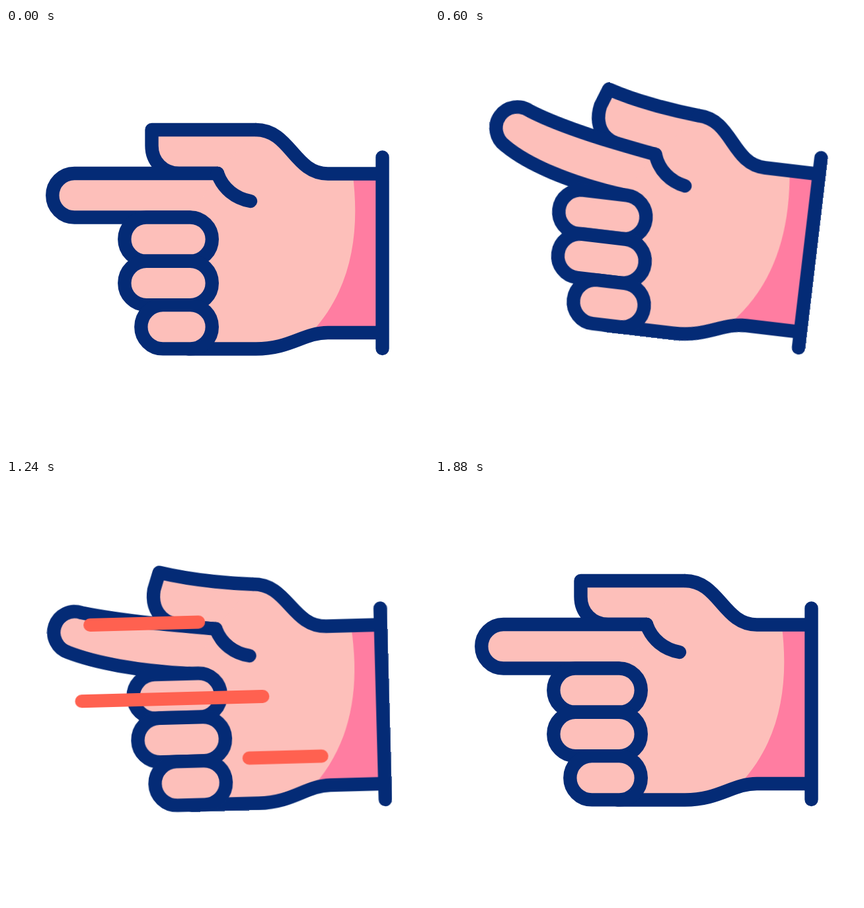
An HTML page without scripts for the animation above (2000 ms loop, 640 by 640 pixels).

```html
<!DOCTYPE html>
<html lang="en">
<head>
<meta charset="utf-8">
<title>Pointing hand</title>
<style>
  @property --head { syntax: "<length>"; inherits: false; initial-value: 0px; }
  @property --tail { syntax: "<length>"; inherits: false; initial-value: 0px; }

  html, body { margin: 0; width: 100%; height: 100%; overflow: hidden; background: #fff; }
  svg { display: block; width: 100%; height: 100%; }

  .ink { fill: none; stroke: #042b76; stroke-width: 20.4; stroke-linecap: round; stroke-linejoin: round; }
  .skin { fill: #fdbfba; }
  .shade { fill: #ff7da1; }

  .hand, .thumb, .index, .curled, .speed {
    animation: 2s cubic-bezier(.5, 0, .5, 1) infinite;
  }

  .hand { transform-origin: 569.5px 320px; animation-name: swing; }
  @keyframes swing {
    0%, 15%, 94%, 100% { transform: rotate(0deg); }
    44.5%, 46% { transform: rotate(13deg); }
    73.6% { transform: rotate(-9.1deg); }
  }

  .thumb {
    --rest: path("M378 154C335 154 280 154 220.5 154L220.5 178C220.5 202 238 220 262 220C280 220 300 220 320 220");
    --bent: path("M378 154C335 150 280 140 243 124L231 151C224 180 236 201 259 208C280 214 300 218 320 220");
    d: var(--rest);
    animation-name: bend-thumb;
  }
  .index {
    --rest: path("M320 220C255 220 180 220 103.5 220C85 220 70.3 235 70.3 253.3C70.3 271.6 85 286.5 103.5 286.5C150 286.5 210 286.5 278 286.5");
    --bent: path("M320 220C255 207 180 192 129 166C114 155 93 158 82 173C71 188 75 209 90 220C124 250 190 275 278 286.5");
    d: var(--rest);
    animation-name: bend-index;
  }
  /* the thumb relaxes a little later than the index finger */
  @keyframes bend-thumb {
    0%, 14.5%, 79%, 100% { d: var(--rest); animation-timing-function: cubic-bezier(.33, 0, .3, 1); }
    43%, 53% { d: var(--bent); animation-timing-function: cubic-bezier(.33, 0, .67, 1); }
  }
  @keyframes bend-index {
    0%, 14.5%, 72.5%, 100% { d: var(--rest); animation-timing-function: cubic-bezier(.33, 0, .3, 1); }
    43%, 53% { d: var(--bent); animation-timing-function: cubic-bezier(.33, 0, .67, 1); }
  }

  .curled { animation-name: slide; animation-delay: var(--lag); }
  @keyframes slide {
    0%, 15%, 72%, 100% { transform: translateX(0); }
    44.5%, 52% { transform: translateX(var(--shift)); }
  }

  /* each line grows from its right end, then its tail catches up */
  .speed {
    stroke: #ff6150; stroke-width: 20; stroke-linecap: round; fill: none; opacity: 0;
    stroke-dasharray: calc(var(--head) - var(--tail)) 200px;
    stroke-dashoffset: calc(0px - var(--tail));
    animation-name: dash;
    animation-timing-function: cubic-bezier(.333, 0, .667, 1);
    animation-delay: var(--at);
  }
  @keyframes dash {
    0% { --head: 0px; --tail: 0px; opacity: 1; }
    12.6% { --tail: 0px; }
    16.7% { --head: 100px; }
    29.3% { --tail: 100px; opacity: 1; }
    29.31%, 100% { --head: 100px; --tail: 100px; opacity: 0; }
  }
</style>
</head>
<body>
<svg viewBox="0 0 640 640">
  <g class="hand">
    <path class="skin" d="M378 154C430 154 436 220.5 487 220.5H569V461H487C450 461 430 485.5 378 485.5H285V286.5H270L300 235L330 200L365 160Z"/>
    <path class="shade" d="M524.5 220C536 310 523 395 462 461H569V220Z"/>
    <path class="ink skin thumb"/>
    <path class="ink skin index"/>

    <!-- palm outline, cuff and crease -->
    <path class="ink" d="M378 154C430 154 436 220.5 487 220.5H569M569 461H487C450 461 430 485.5 378 485.5H276M569.5 195.5V485M320 220C328 243 347 258 370 262"/>

    <rect class="ink skin curled" style="--shift: 17px; --lag: 60ms" x="179.3" y="286.5" width="132.5" height="66.3" rx="33.1"/>
    <rect class="ink skin curled" style="--shift: 28.5px; --lag: 30ms" x="179.3" y="352.8" width="132.5" height="66.3" rx="33.1"/>
    <rect class="ink skin curled" style="--shift: 35.5px; --lag: 0ms" x="204.3" y="419.1" width="107.5" height="66.3" rx="33.1"/>

    <path class="speed" style="--at: 835ms" pathLength="100" d="M424 209H130"/>
    <path class="speed" style="--at: 957ms" pathLength="100" d="M396 324H96"/>
    <path class="speed" style="--at: 1025ms" pathLength="100" d="M475 416.7H321"/>
  </g>
</svg>
</body>
</html>
```
